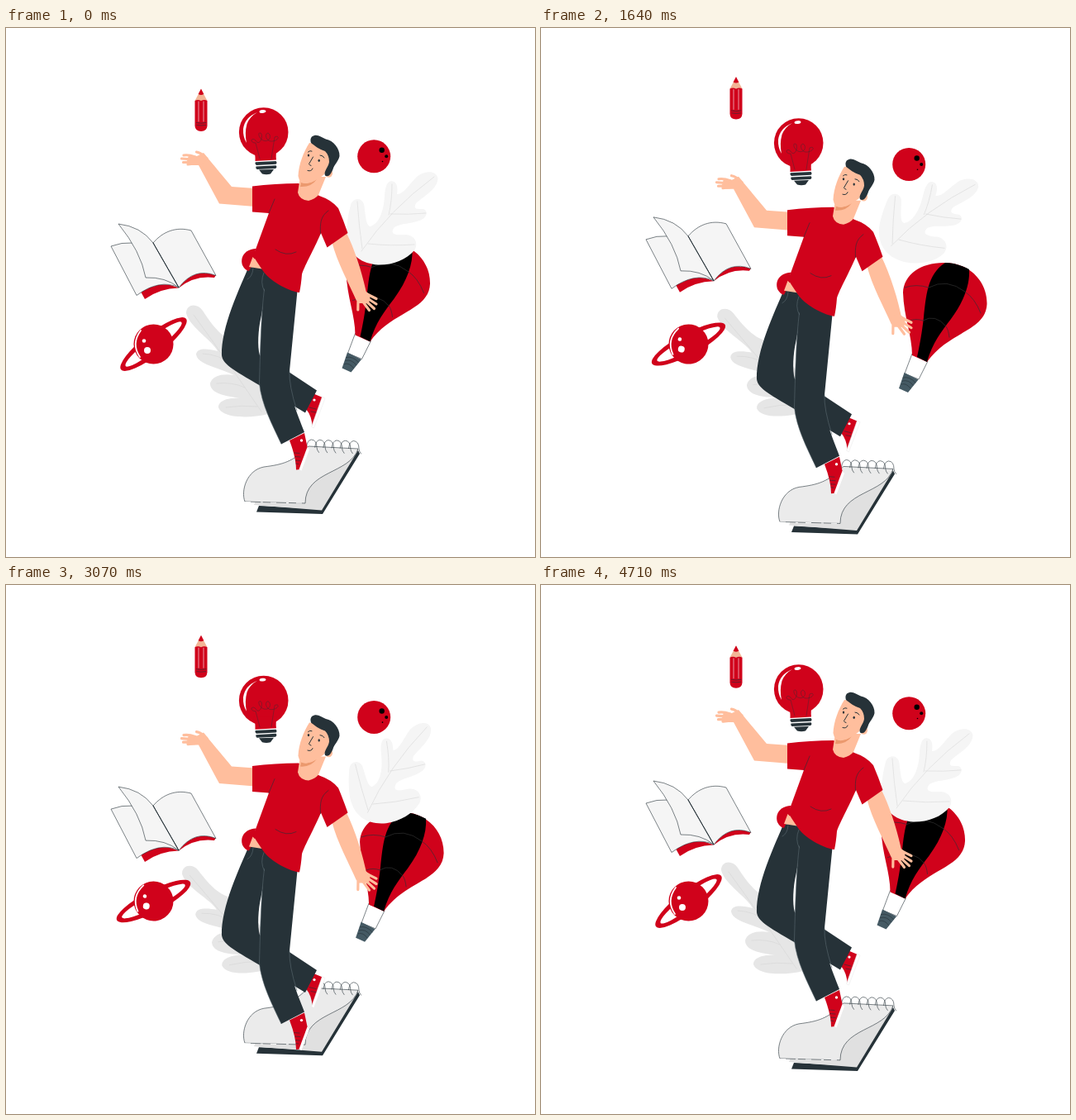
Recreate the animation shown at these times as an HTML page. Size 640 by 640 pixels, loop 4.78 s.

```html
<!DOCTYPE html>
<html lang="en">
<head>
<meta charset="utf-8">
<title>Juggling ideas</title>
<style>
  html, body { margin: 0; width: 100%; height: 100%; overflow: hidden; background: #fff; }
  svg { display: block; width: 100%; height: 100%; }
  .red { fill: #d0021b; }
  .dark { fill: #263238; }
  .skin { fill: #ffbe9d; }
  .white { fill: #fff; }
  .line { fill: none; stroke: #263238; stroke-width: .6; stroke-linecap: round; stroke-linejoin: round; }
  .edge { stroke: #263238; stroke-width: .6; stroke-linejoin: round; }
  .finger { fill: none; stroke: #ffbe9d; stroke-width: 3.2; stroke-linecap: round; stroke-linejoin: round; }
  .vein { fill: none; stroke: #e0e0e0; stroke-width: .8; stroke-linecap: round; }
  .shine { fill: none; stroke: #fff; stroke-linecap: round; }
</style>
</head>
<body>
<svg viewBox="0 0 640 640">
  <g id="lowLeaf">
    <path fill="#e6e6e6" d="M317 467C297 472 262 473 257 459C257 449 273 447 285 448C265 446 247 442 247 430C250 419 265 418 276 420C255 410 232 407 230 395C231 386 245 388 256 391C250 378 222 362 218 345C218 334 231 332 238 342C247 356 258 371 270 376L300 400L318 440Z"/>
    <path class="vein" style="stroke:#dadada" d="M227 347Q262 395 309 464M238 394Q258 395 271 406M255 430Q274 428 289 435M266 459Q285 456 304 458"/>
  </g>

  <g id="pad">
    <path class="dark" d="M306 578L303 585.500L383 588L428 515L425 509L380 582Z"/>
    <path fill="#e0e0e0" d="M300 577L382 583.500L426 511L366 506L302 572Z"/>
    <path class="edge" fill="#ebebeb" d="M289 573C284 560 291 535 312 531C335 528 347 525 366 506L426 509C416 540 362 535 362 575Z"/>
    <path d="M289 573.500L362 575" fill="none" stroke="#fff" stroke-width="1" stroke-dasharray="7 12 3 9"/>
    <g id="rings"></g>
  </g>

  <g id="balloon"><g transform="translate(-26.500 -24.500)">
    <path class="white edge" d="M449 394L440 418L457 425L468 403Z"/>
    <path class="red" d="M449 396C449 372 439 350 438 320C439 298 460 283 490 284C520 285 540 308 539.500 334C538 367 493 367 467 404Z"/>
    <path d="M489 284C467 298 466 325 463 350C461 368 458 385 455 398L467 404C474 380 484 368 496 352C512 330 519 310 518 292Q503 284 489 284Z"/>
    <path class="line" d="M440 314Q454 309 469 314M513 319Q525 327 532 345M446 354Q454 351 462 354M490 361Q493 365 494 374"/>
    <path class="line" style="stroke:#3a3a3a" d="M469 314Q491 302 513 319M462 354Q477 345 490 361"/>
    <path fill="#455a64" d="M439.500 417L456.500 425.500L444 441L433 436Z"/>
    <path class="line" d="M438 423Q446 421 453 429M437 427Q445 425 450 432M436 431Q442 429 447 436"/>
  </g></g>

  <g id="highLeaf">
    <path fill="#f5f5f5" d="M450 286.500C430 285 414 275 412 250C412 235 415 222 417 214C420 205 430 205 433 213C435 224 435 240 441 240C451 237 457 222 458 203C459 188 463 184 468 185.500C474 187 474 195 473 201C480 202 487 190 497 180C507 172 521 172 522.500 182C522 195 506 203 496 212C492 220 498 219 505 219C511 221 510 230 500 233C490 237 478 236 470 241C463 250 472 251 484 250C496 251 499 262 494 269C484 281 467 287 450 286.500Z"/>
    <path class="vein" d="M430 270Q464 220 518 180M425 210Q427 240 431 267M467 189Q467 210 463 226M465 225Q487 226 508 224M438 261Q465 264 494 262"/>
  </g>

  <g id="planet">
    <g transform="rotate(-38 178.500 382.500)">
      <path class="red" fill-rule="evenodd" d="M128.500 382.500a50 13 0 1 0 100 0a50 13 0 1 0-100 0M135.500 382.500a43 7.500 0 1 0 86 0a43 7.500 0 1 0-86 0"/>
    </g>
    <circle class="red" cx="178.500" cy="382.500" r="24"/>
    <path class="shine" stroke-width="1.800" d="M162 398Q151 382 163 366"/>
    <circle class="white" cx="171" cy="390" r="4"/>
    <circle class="white" cx="167" cy="378.500" r="2.300"/>
  </g>

  <g id="book">
    <path class="red" d="M163 319L168 328Q186 315 209 314.500Q186 304 163 319Z"/>
    <path class="edge" fill="#f5f5f5" d="M127 264Q140 259 153 260L209 314Q186 303 158 323.500Z"/>
    <path class="red" d="M209 314.500Q226 290 254 299L252 302Q228 299 209 314.500Z"/>
    <path class="edge" fill="#f5f5f5" d="M178 260C190 246 206 240 224 245L254 299.500Q228 289 209 314Z"/>
    <path class="edge" fill="#f5f5f5" d="M136 237Q163 240 178 260L209 314Q193 301 169 302Q163 270 136 237Z"/>
    <path class="line" style="stroke-width:1" d="M178 260L209 314"/>
  </g>

  <g id="pencil">
    <path fill="#f2b596" d="M236 74L228.500 88H243.500Z"/>
    <path class="red" d="M236 73.500L232.600 80Q236 82 239.300 80Z"/>
    <path class="red" d="M228.500 88Q232 86 236 88Q240 86 243.500 88V118.500Q243 125 236 125Q229 125 228.500 118.500Z"/>
    <path class="shine" stroke-width=".9" opacity=".65" d="M233 89V113M239 89V113"/>
    <path class="line" d="M230.500 114.500Q236 116 242 114.500M231 117.500Q236 118.500 241.500 117.500"/>
  </g>

  <g id="bulb">
    <circle class="red" cx="311.700" cy="126" r="29.800"/>
    <path class="red" d="M299 146Q302 152 301.500 161L327 159.500Q326 152 328 146Z"/>
    <path class="dark" d="M302 162.300L326.500 161Q328.500 163 326.500 164.800L303 166Q300.500 164 302 162.300ZM302.500 167.500L326.500 166.200Q328.500 168.300 326 170L303.500 171Q301.500 169 302.500 167.500ZM306 171.600L324 171L320 176.500Q315 178 310 176.500Z"/>
    <path class="white" d="M304 102Q289 108 287 122Q286.500 132 291 139Q288.500 127 291.500 116Q295 107 304 102Z"/>
    <ellipse class="white" cx="310.500" cy="101" rx="4" ry="1.900" transform="rotate(-6 310.500 101)"/>
    <path class="line" opacity=".65" d="M307 158L302 139C294 139 297 131 302 136C306 143 311 134 309 128C305 124 304 132 311 136C319 139 322 130 317 127C312 128 315 138 322 137C331 136 331 129 325 132L321 158"/>
  </g>

  <g id="ball">
    <circle class="red" cx="445.200" cy="155.300" r="20"/>
    <circle cx="454.700" cy="147.800" r="3.200"/>
    <circle cx="460.200" cy="155.300" r="2"/>
    <circle cx="455.500" cy="161.500" r=".8"/>
  </g>

  <g id="man">
    <path class="red" d="M371 442L383 447L370.500 483Q370.500 470 363 461Z"/>
    <path class="white" stroke="#e6e6e6" stroke-width=".5" d="M382.500 446L386 448L372.500 484L369.500 482.500Z"/>
    <circle class="white" cx="373" cy="450" r="1.600"/>
    <path class="line" d="M367 459L375 461M369 464L375 465"/>
    <path class="dark" d="M294 288C283 314 260 362 261 396C262 406 272 412 308 433L362 465.500L376 438.500L342 416L307 396C304 385 305 365 308.500 350L313 325L325 300Z"/>

    <path class="red" d="M343 499L361 490L365 509L356 534L351 534.500Q351 520 343 499Z"/>
    <path class="white" d="M364.500 507L367 510L357.500 535.500L354.500 534Z"/>
    <circle class="white" cx="357.500" cy="499" r="1.700"/>
    <path class="line" d="M349 514L355 514.500M350 518.500L356 519M350.500 523L356 523.500M351 527L354 527.500"/>
    <path class="dark" d="M297 288L312.500 316C309 345 308 375 306.500 430C309 455 322 480 333 503.500L361 489C352 465 342 445 343 415L352.500 318L325 290Z"/>
    <path class="line" style="stroke:#5b6a71" d="M312.500 316C309 345 308 375 306.500 430C309 455 322 480 333 503M299 291Q298 301 292 304M312 296Q307 308 312.500 318M343 415Q342 432 352 463"/>

    <path class="skin" d="M301 194L273 192L243 156L233 166L258 212.500L301 216Z"/>
    <path class="skin" d="M245 158L239 151L231 155L221 154L219 161L224 166H236Z"/>
    <path class="finger" d="M239 155Q236 151 230.500 150M229 156Q221 153 215 154M226 159L212.500 158M226 162L214.500 162.500M229 164L220 165"/>

    <path class="skin" d="M394 258C401 285 415 309 424 330L437 325C432 300 423 270 411 246Z"/>
    <path class="skin" d="M423 320L433 317L441 323L439 333L426 333Z"/>
    <path class="finger" d="M435 321L448 327.500M434 325L448 334M433 328L445.500 339.500M431 330L439.500 341.500M426 328L425.800 341"/>

    <path class="red" d="M302 267C288 268 283 278 286 287Q289 293 294 294L301 280Z"/>
    <path class="skin" d="M298.500 277L313 292L294 289Z"/>
    <path class="red" d="M298 191.500Q325 188 354 188L379 203Q394 208 402 218Q408 232 413.500 248L388.500 265.500L381 248C374 265 361 288 358 298Q357 311 355 320C345 319 322 309 311 294L299 276L318 224L298 222.500Z"/>
    <path class="line" d="M325 207L318 224M390 221C380 228 380 237 380.500 249M326 268Q339 277 351 271"/>

    <path class="skin" d="M356 180L353 199Q355 208 366 209Q374 207 378 202L387 180Z"/>
    <path fill="#eb996e" d="M357 187Q367 190 376 183Q369 193 356 192Z"/>
    <path class="skin" d="M367 139C360 150 354 165 353.500 179Q355 189 364 188Q375 185 384 178L394 166L393 152L380 140Z"/>
    <ellipse class="skin" cx="390.500" cy="175.500" rx="4.600" ry="5.200"/>
    <path class="dark" d="M370 131.500C376 127 381 132 387 134.500C396 136 404 146 403.500 155C402 162 397 165 395.500 171C393 177 390 181 386 178.500C384 173 390 169 391 162Q391 154 386 149C379 147 373 142 369 139Q367.500 134 370 131.500Z"/>
    <path class="line" style="stroke-width:1" d="M365.500 150Q367.500 147.800 370 149M380 154Q383.500 154 385 157M371.500 156L366.500 164.500Q367 166 369 166.500M365 172.500Q369.500 174 371 170"/>
    <ellipse class="dark" cx="366" cy="154" rx="1.200" ry="1.600"/>
    <ellipse class="dark" cx="378.700" cy="160.300" rx="1.200" ry="1.600"/>
  </g>
</svg>
<script>
const LOOP = 4780, FPS = 14, LAST = 66;
const $ = id => document.getElementById(id);

let loops = '';
for (let i = 0; i < 6; i++)
  loops += `M${363.5 + i * 10.2} ${507 + i * 0.3}q1-8.500 6-9q6.500 .5 6.500 9.500q0 3 2.500 6`;
$('rings').innerHTML = `<path class="line" d="${loops}"/>`;

const move = (dx, dy) => v => `translate(${dx * v} ${dy * v})`;
const turn = (x, y) => v => `rotate(${v} ${x} ${y})`;

// Each part: id, transform, then [ms, value] keys eased by a half cosine.
const parts = [
  ['pencil',   move(0, 1),      [1195, -21], [2390, 0], [3585, -21]],
  ['bulb',     move(0, 1),      [2390, 16.8]],
  ['ball',     move(0, 1),      [1593, 9.7], [3187, 4.6]],
  ['book',     move(0, 1),      [1593, -8.2], [3187, 7.3]],
  ['planet',   turn(178.5, 382.5), [2390, 13]],
  ['lowLeaf',  turn(277, 407),  [2390, -5.8]],
  ['highLeaf', turn(465, 228),  [1700, 9.5], [3350, -11]],
  ['balloon',  move(27, 25),    [1800, 1]],
  ['pad',      move(0, 1),      [1700, 24.5], [3350, -22]],
  ['man',      move(0, 1),      [2300, 35.4]]
].map(([id, transform, ...keys]) => ({
  el: $(id), transform, keys: [[0, 0], ...keys, [LOOP, 0]]
}));

function valueAt(keys, t) {
  const i = keys.findIndex(k => k[0] > t);
  const [t0, a] = keys[i - 1], [t1, b] = keys[i];
  return a + (b - a) * (1 - Math.cos(Math.PI * (t - t0) / (t1 - t0))) / 2;
}

function draw(now) {
  const step = Math.min(LAST, Math.floor((now % LOOP + 5) * FPS / 1000));
  const t = step * 1000 / FPS;
  for (const { el, transform, keys } of parts)
    el.setAttribute('transform', transform(valueAt(keys, t)));
}

let start;
function tick(now) {
  start ??= now;
  draw(now - start);
  requestAnimationFrame(tick);
}
draw(0);
requestAnimationFrame(tick);
</script>
</body>
</html>
```
